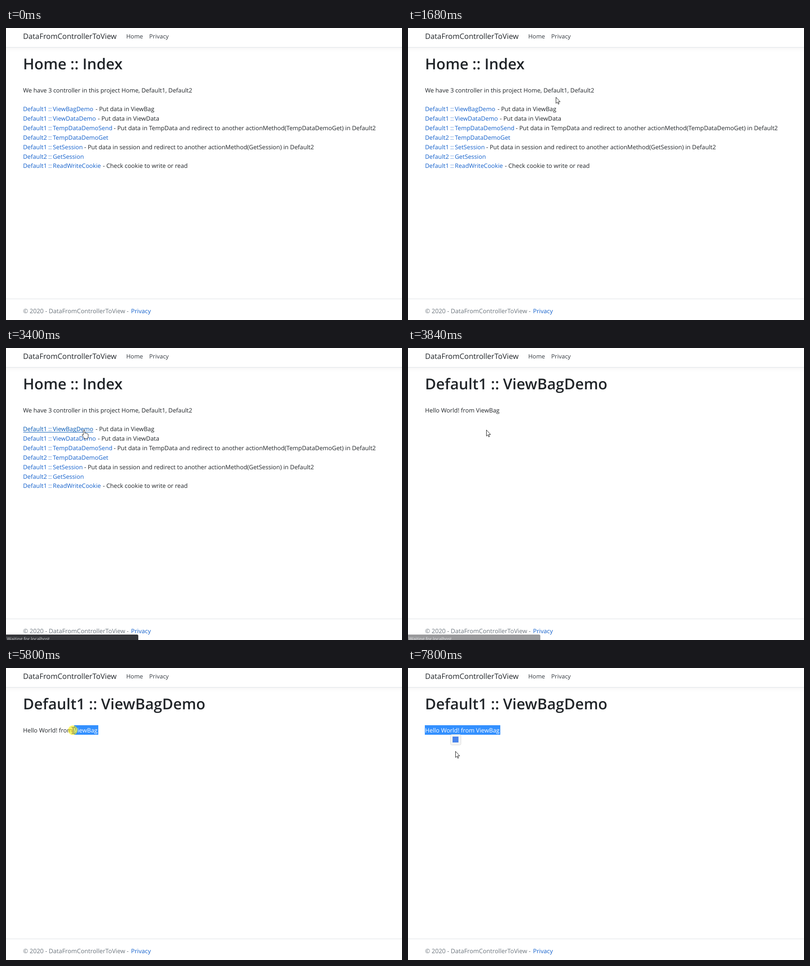
An HTML page that plays this animation: 871x643 px, repeating every 8000 ms.

```html
<!DOCTYPE html>
<html lang="en">
<head>
<meta charset="utf-8">
<title>DataFromControllerToView</title>
<style>
  html, body { margin: 0; width: 100%; height: 100%; overflow: hidden; background: #fff; }
  svg { display: block; width: 871px; height: 643px; }
  text {
    font: 13.2px "Open Sans", "Noto Sans", sans-serif;
    fill: #212529; white-space: pre; text-rendering: geometricPrecision;
  }
  .title { font-size: 33px; font-weight: 600; }
  .brand { font-size: 16.4px; }
  .nav { fill: #343a40; font-size: 13px; }
  .link { fill: #1461cc; }
  .hovered .link { fill: #0056b3; }
  .muted { fill: #6c757d; font-size: 13.4px; }
  .status { fill: #d5d7da; font-size: 9.87px; }
  .selected { fill: #fff; }
  .header { fill: #fff; filter: drop-shadow(0 3.5px 5px rgba(0, 0, 0, .05)); }
  .rule { fill: #dee2e6; }
  .pointer { fill: #fff; stroke: #222; stroke-linejoin: round; }
</style>
</head>
<body>
<svg viewBox="0 0 871 643">
  <rect class="header" x="-20" y="-20" width="911" height="62"/>
  <rect class="rule" y="42" width="871" height="1"/>
  <text class="brand" x="37.5" y="24">DataFromControllerToView</text>
  <text class="nav" x="264.5" y="23">Home</text>
  <text class="nav" x="315" y="23">Privacy</text>

  <g id="indexPage">
    <text class="title" x="37.5" y="91">Home :: Index</text>
    <text x="37.5" y="142">We have 3 controller in this project Home, Default1, Default2</text>
    <g id="links"></g>
    <rect id="underline" x="38" y="185" width="154" height="1" fill="#0056b3"/>
  </g>

  <g id="demoPage">
    <text class="title" x="37.5" y="91">Default1 :: ViewBagDemo</text>
    <text id="message" x="37.5" y="142">Hello World! from ViewBag</text>
    <clipPath id="selectionClip"><rect id="selectionArea" y="126" height="21"/></clipPath>
    <g id="selection" clip-path="url(#selectionClip)">
      <rect x="37" y="126" width="166" height="21" fill="#3390ff"/>
      <text class="selected" x="37.5" y="142">Hello World! from ViewBag</text>
    </g>
  </g>

  <rect class="rule" y="596" width="871" height="1"/>
  <text class="muted" x="37.5" y="628">© 2020 - DataFromControllerToView -</text>
  <text class="link" x="275" y="628">Privacy</text>

  <g id="statusBar">
    <rect id="statusBox" x="-4" y="631" height="20" rx="3" fill="#35363a"/>
    <text id="statusText" class="status" x="2" y="643.5"></text>
  </g>

  <g id="button">
    <rect x=".5" y=".5" width="23" height="23" rx="3" fill="#f5f5f5" stroke="#dcdcdc"/>
    <rect x="5" y="5" width="13" height="13" fill="#4a84ec"/>
  </g>

  <g id="cursor">
    <circle id="press" r="10.5" fill="#fbf000" opacity=".58"/>
    <path id="arrow" class="pointer" d="M.5.5V14l3-2.8 2 4.6 1.9-.8-2-4.5h4.3z"/>
    <path id="hand" class="pointer" d="M-2 12V2.5a1.6 1.6 0 0 1 3.2 0v5q2-1 2.6.6 2-.8 2.6.8 2.3-.5 2.4 1.6v4q0 2.5-1.6 4.5v1H.5v-1q-1-1.5-4.8-6.5-.6-1.8 1-1.8z"/>
    <path id="beam" d="M-2.5-6.5h2l1 1 1-1h2M.5-5.5v12M-2.5 7.5h2l1-1 1 1h2" fill="none" stroke="#444"/>
  </g>
</svg>
<script>
const LOOP = 8000, STEP = 40;
const el = id => document.getElementById(id);
const show = (id, visible) => { el(id).style.display = visible ? '' : 'none'; };
const between = (t, from, to) => t >= from && t < to;

// controller, action, x of the description, description
const actions = [
  ['Default1', 'ViewBagDemo', 197, 'Put data in ViewBag'],
  ['Default1', 'ViewDataDemo', 202, 'Put data in ViewData'],
  ['Default1', 'TempDataDemoSend', 237, 'Put data in TempData and redirect to another actionMethod(TempDataDemoGet) in Default2'],
  ['Default2', 'TempDataDemoGet'],
  ['Default1', 'SetSession', 172, 'Put data in session and redirect to another actionMethod(GetSession) in Default2'],
  ['Default2', 'GetSession'],
  ['Default1', 'ReadWriteCookie', 213, 'Check cookie to write or read'],
];
el('links').innerHTML = actions.map(([controller, action, x, note], i) => {
  const y = 183.3 + i * 20.85;
  return `<g><text class="link" x="37.5" y="${y}">${controller} ::</text>` +
    `<text class="link" x="103" y="${y}">${action}</text>` +
    (note ? `<text x="${x}" y="${y}">- ${note}</text>` : '') + '</g>';
}).join('');
const firstLink = el('links').firstChild;

// time, x, y
const path = [
  [600, 797, 590], [1360, 481, 159], [1400, 481, 159], [1680, 325, 152],
  [2240, 206, 170], [2480, 188, 166], [2920, 172, 180], [3840, 172, 180],
  [4400, 237, 241], [4680, 237, 241], [5480, 210, 142], [5560, 210, 142],
  [5800, 147, 137], [6320, 52, 132], [6400, 52, 132], [6560, 36, 132],
  [6880, 36, 132], [7200, 104, 182], [7640, 104, 182], [7680, 104, 183], [LOOP, 104, 183],
];

function cursorAt(t) {
  const i = Math.max(1, path.findIndex(p => p[0] > t));
  const [t0, x0, y0] = path[i - 1], [t1, x1, y1] = path[i];
  const k = Math.max(0, (t - t0) / (t1 - t0));
  return [Math.round(x0 + (x1 - x0) * k), Math.round(y0 + (y1 - y0) * k)];
}

// The selection runs from the end of the message back to the nearest letter edge.
function selectionStart(x) {
  const message = el('message');
  for (let i = 0; i < message.getNumberOfChars(); i++) {
    const edge = message.getStartPositionOfChar(i).x;
    if (edge > x + 1) return edge;
  }
  return 203;
}

function drawStatus(t) {
  const waiting = t >= 3400;
  show('statusBar', between(t, 2480, 3920));
  el('statusBar').style.opacity = t < 2560 || t >= 3840 ? .5 : 1;
  el('statusBox').setAttribute('width', waiting ? 295 : 231);
  el('statusText').textContent = waiting
    ? 'Waiting for localhost...' : 'https://localhost:44325/Default1/ViewBagDemo';
}

function draw(t) {
  const [x, y] = cursorAt(t);
  const onIndex = t < 3480;
  const overLink = between(t, 2280, 3840) && x < 193;
  const overText = between(t, 5480, 6880) && x > 37 && x < 204;

  show('indexPage', onIndex);
  show('demoPage', !onIndex);
  show('underline', overLink);
  firstLink.setAttribute('class', overLink ? 'hovered' : '');
  drawStatus(t);

  show('selection', t >= 5560);
  if (t >= 5560) {
    const start = t < 6560 ? selectionStart(x) : 37;
    el('selectionArea').setAttribute('x', start);
    el('selectionArea').setAttribute('width', 203 - start);
  }

  show('button', between(t, 6880, 7680) || t >= 7800);
  el('button').setAttribute('transform', t < 7680 ? 'translate(24 102)' : 'translate(93 146)');

  show('cursor', t >= 600);
  el('cursor').setAttribute('transform', `translate(${x} ${y})`);
  show('press', between(t, 3080, 3160) || between(t, 5560, 6880) || between(t, 7680, 7800));
  show('hand', overLink);
  show('beam', overText);
  show('arrow', !overLink && !overText);
}

function tick(now) {
  draw(Math.floor(now % LOOP / STEP) * STEP);
  requestAnimationFrame(tick);
}
draw(0);
requestAnimationFrame(tick);
</script>
</body>
</html>
```
